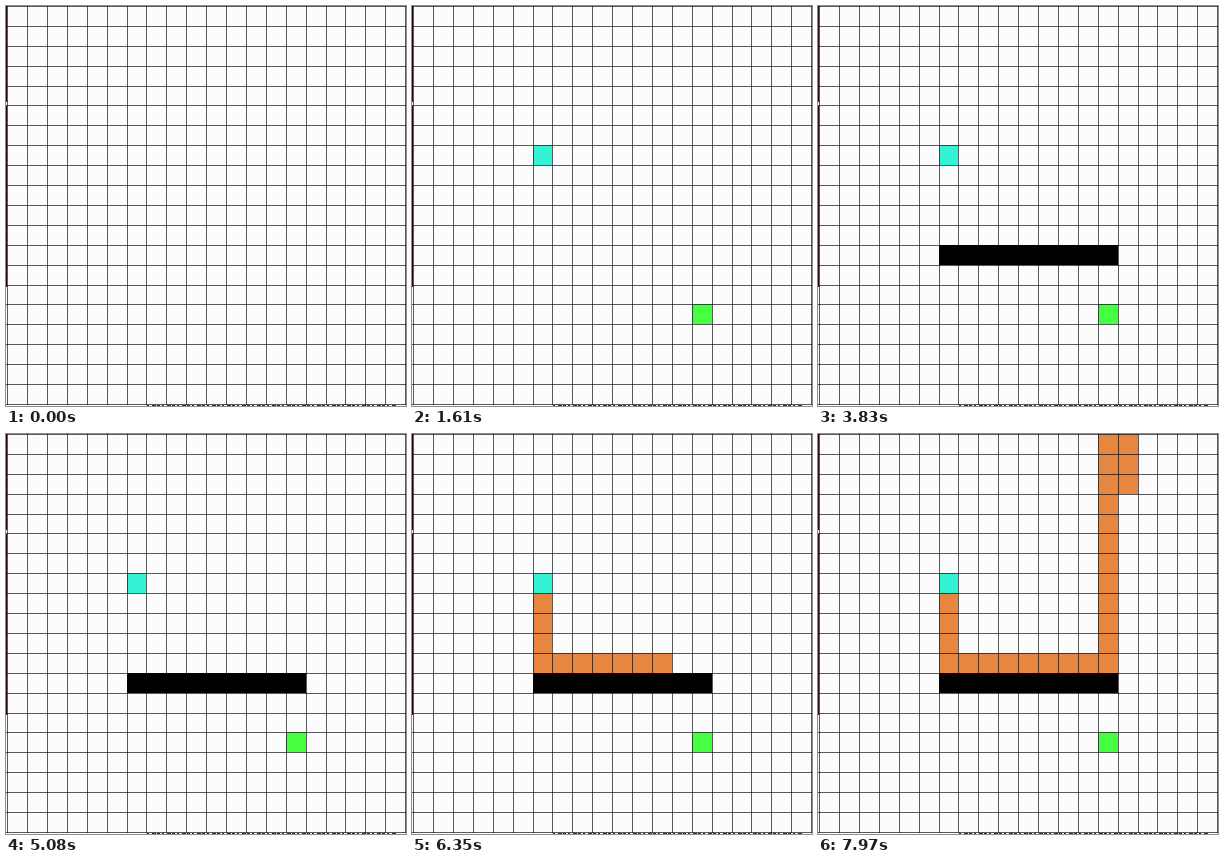
An HTML page with a canvas that plays this animation: 400x400 px, repeating every 8000 ms.

```html
<!DOCTYPE html>
<html lang="en">
<head>
<meta charset="utf-8">
<title>Grid path</title>
<style>
html, body { margin: 0; width: 100%; height: 100%; overflow: hidden; background: #fcfcfc; }
canvas { display: block; }
</style>
</head>
<body>
<canvas id="stage" width="400" height="400"></canvas>
<script>
const ctx = document.getElementById('stage').getContext('2d');
const LOOP = 8000;
const LINE = 'rgba(0, 0, 8, 0.65)';
const PITCH = 19.9;
const lineX = k => Math.round(1.15 + PITCH * k);
const lineY = k => Math.round(PITCH * k - 0.09);

const WALL_TIMES = [2060, 2210, 2370, 2500, 2630, 2880, 3110, 3420, 3680];
const PATH_START = 5315;
const PATH_STEP = 101;

// The path goes down, right along the wall, up to the top, then down the next column.
const path = [];
for (let row = 8; row <= 11; row++) path.push([6, row]);
for (let col = 7; col <= 14; col++) path.push([col, 11]);
for (let row = 10; row >= 0; row--) path.push([14, row]);
for (let row = 0; row <= 2; row++) path.push([15, row]);

function rect(color, x, y, w, h) {
  ctx.fillStyle = color;
  ctx.fillRect(x, y, w, h);
}

function cell(col, row, color) {
  const x = lineX(col), y = lineY(row);
  rect(color, x, y, lineX(col + 1) - x, lineY(row + 1) - y);
}

function drawGrid() {
  for (let k = 0; k <= 20; k++) {
    rect(LINE, lineX(k), 0, 1, 399);
    rect(LINE, 0, lineY(k), 400, 1);
  }
}

function drawEdges() {
  rect('#240c0c', 0, 0, 1, 96);
  rect('#240c0c', 0, 100, 1, 181);
  for (let x = 141; x < 391; x += 5) {
    rect('#33332e', x, 399, 2 + (x * 7 % 3), 1);
  }
}

function draw(t) {
  rect('#fcfcfc', 0, 0, 400, 400);
  if (t >= 450) cell(6, 7, '#34f3d4');
  if (t >= 1230) cell(14, 15, '#46ff40');
  const steps = Math.floor((t - PATH_START) / PATH_STEP);
  path.slice(0, Math.max(0, steps)).forEach(([col, row]) => cell(col, row, '#e6863f'));
  drawGrid();
  WALL_TIMES.forEach((start, i) => {
    if (t >= start) cell(6 + i, 12, '#000');
  });
  drawEdges();
}

const begin = performance.now();
function frame() {
  draw((performance.now() - begin) % LOOP);
  requestAnimationFrame(frame);
}
frame();
</script>
</body>
</html>
```
